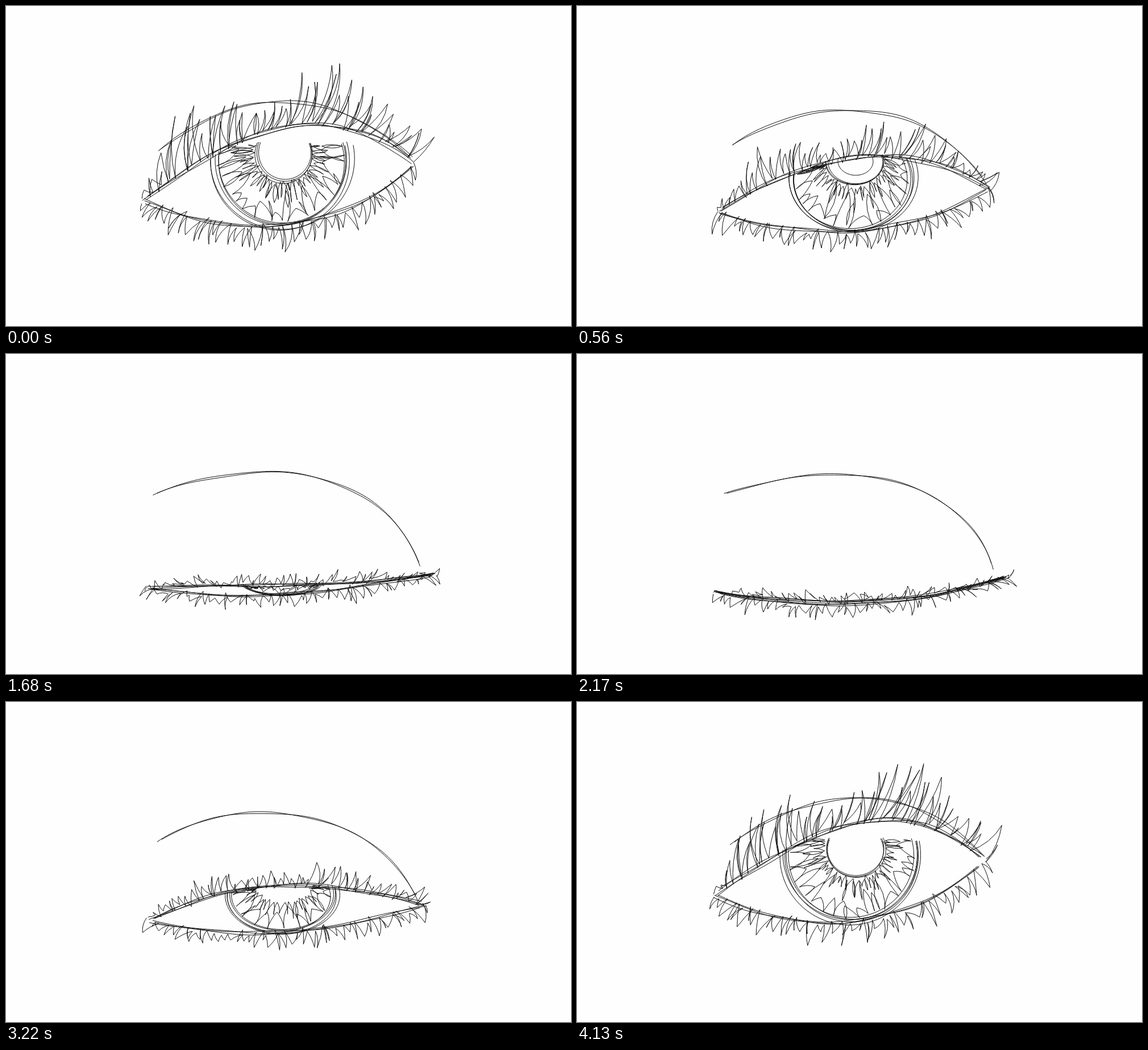
Recreate the animation shown at these times as an HTML page with a canvas. Size 994x563 px, loop 4200 ms.

```html
<!DOCTYPE html>
<html lang="en">
<head>
<meta charset="utf-8">
<title>Blinking eye</title>
<style>
  html, body { margin: 0; width: 100%; height: 100%; overflow: hidden; background: #fefefe; }
  canvas { display: block; }
</style>
</head>
<body>
<canvas id="stage" width="994" height="563"></canvas>
<script>
const ctx = document.getElementById('stage').getContext('2d');
const LOOP = 4200, STEP = 70;
const { sin, cos, min, max, round, PI } = Math;

// Time in ms and how far the eye is open
const blink = [
  [0, 1], [560, 0.78], [1120, 0.4], [1680, 0.16], [2100, 0],
  [2660, 0.3], [3220, 0.53], [4060, 1], [LOOP, 1]
];

const mix = (a, b, k) => a + (b - a) * k;
const between = (p, q, k) => [mix(p[0], q[0], k), mix(p[1], q[1], k)];
const unit = v => max(0, min(1, v));
const rad = d => d * PI / 180;
let rand;

function seeded(seed) {
  let s = seed * 7919 + 101;
  return () => {
    s = (s + 0x6D2B79F5) | 0;
    let v = Math.imul(s ^ (s >>> 15), 1 | s);
    v = (v + Math.imul(v ^ (v >>> 7), 61 | v)) ^ v;
    return ((v ^ (v >>> 14)) >>> 0) / 4294967296;
  };
}
const spread = r => (rand() * 2 - 1) * r;

function openness(t) {
  const i = blink.findIndex(key => key[0] > t);
  const [t0, a] = blink[i - 1], [t1, b] = blink[i];
  return mix(a, b, (t - t0) / (t1 - t0));
}

// A lid spans the corners and bulges by a on the left, b on the right
function lidCurve(left, right, a, b) {
  const height = u => mix(left[1], right[1], u) + 3 * u * (1 - u) * mix(a, b, u);
  return {
    at: u => [mix(left[0], right[0], u), height(u)],
    y: x => height(unit((x - left[0]) / (right[0] - left[0])))
  };
}

function bezier(p0, p1, p2, p3) {
  return {
    at: u => {
      const a = between(p0, p1, u), b = between(p1, p2, u), c = between(p2, p3, u);
      return between(between(a, b, u), between(b, c, u), u);
    }
  };
}

function line(points) {
  ctx.beginPath();
  points.forEach(p => ctx.lineTo(...p));
  ctx.stroke();
}

function sketch(curve, passes, wobble) {
  for (let n = 0; n < passes; n++) {
    const p = rand() * 7, q = rand() * 7, tilt = spread(wobble), from = rand() * 0.03, to = 1 - rand() * 0.03;
    const points = [];
    for (let i = 0; i <= 70; i++) {
      const k = i / 70, [x, y] = curve.at(mix(from, to, k));
      points.push([x, y + tilt * (k - 0.5) + wobble * (sin(k * 8 + p) * 0.7 + sin(k * 19 + q) * 0.3)]);
    }
    line(points);
  }
}

// One unbroken stroke, out to each tip and back
function zigzag(n, overlap, spike) {
  let here = spike(0).base;
  ctx.beginPath();
  ctx.moveTo(...here);
  for (let i = 0; i < n; i++) {
    const { tip, out, back } = spike((i + 0.5) / n);
    const next = spike((i + 1 + spread(overlap)) / n).base;
    const bow = (p, b) => [
      (p[0] + tip[0]) / 2 - (tip[1] - p[1]) * b,
      (p[1] + tip[1]) / 2 + (tip[0] - p[0]) * b
    ];
    ctx.quadraticCurveTo(...bow(here, out), ...tip);
    ctx.quadraticCurveTo(...bow(next, back), ...next);
    here = next;
  }
  ctx.stroke();
}

function lashes(curve, n, dir, length, left, right) {
  zigzag(n, 0.9, v => {
    const u = unit(v), [x, y] = curve.at(u);
    const base = [x + spread(3), y + spread(6)];
    const a = rad(mix(left, right, u) + spread(10));
    const len = length(u) * mix(0.4, 1, rand());
    const bend = (u < 0.4 ? 0.12 : -0.12) * dir;
    return {
      base,
      tip: [base[0] + sin(a) * len, base[1] + cos(a) * len * dir],
      out: bend + spread(0.08),
      back: bend + spread(0.1)
    };
  });
}

const ellipse = (cx, cy, rx, ry) => (a, s) => [cx + cos(a) * rx * s, cy + sin(a) * ry * s];

function ring(shape, scale, top, from, to, loose) {
  const dx = spread(loose), dy = spread(loose / 2), s = scale + spread(0.03), points = [];
  for (let d = from; d <= to; d += 4) {
    const [x, y] = shape(rad(d), s + 0.015 * sin(d / 40 + dx));
    if (y + dy >= top(x) - 3) points.push([x + dx, y + dy]);
  }
  line(points);
}

function drawIris(open, upper, lower) {
  const cx = 484, lidY = upper.y(cx), floor = lower.y(cx), gap = floor - lidY;
  if (gap < 9) return;

  const ry = 6 + 112 * open;
  const limit = max(lidY, 246);
  const top = x => max(upper.y(x), limit - 4);
  const outer = ellipse(cx, floor + 2 - ry, 50 + 70 * open ** 0.7, ry);
  const inner = ellipse(cx + 5, limit + 13 - 35 * (1 - open), 48 + spread(4), 8 + 39 * open);
  const keep = ([x, y]) => [x, min(lower.y(x) + 6, max(y, top(x) + rand() * 6))];

  for (let i = 0; i < 5; i++) ring(outer, 1.03 - i * 0.025, top, -60, 240, 5);
  if (gap > 95) {
    for (let i = 0; i < 3; i++) ring(inner, 1 + i * 0.03, top, -25, 205, 3);
    if (limit === lidY) ring(inner, 0.66, top, -70, 250, 2);
  }

  const petals = (n, inward, low, high) => zigzag(n, 0.6, u => {
    const a = rad(mix(-22, 202, u));
    const ends = [inner(a, 1.03), outer(a + spread(0.1), 0.95)];
    const [start, end] = inward ? ends.reverse() : ends;
    return {
      base: keep(between(start, end, rand() * 0.12)),
      tip: keep(between(start, end, mix(low, high, rand()))),
      out: 0.14 + spread(0.1),
      back: -0.14 + spread(0.1)
    };
  });
  const density = min(1, 0.3 + gap / 230);
  petals(round(40 * density), false, 0.2, 0.65);
  petals(round(24 * density), true, 0.25, 0.85);
}

function draw(step) {
  const open = openness(step * STEP), shut = 1 - open;
  rand = seeded(step + 1);
  ctx.fillStyle = '#fefefe';
  ctx.fillRect(0, 0, 994, 563);
  ctx.strokeStyle = '#111';
  ctx.lineWidth = 1;
  ctx.lineJoin = ctx.lineCap = 'round';

  const left = [240 + 10 * sin(PI * open), 418 - 76 * open ** 1.3];
  const right = [764 - 46 * open, 390 - 112 * open ** 2];
  const upper = lidCurve(left, right, 52 - 145 * (1 - shut ** 2.5), 52 - 210 * open);
  const lower = lidCurve(left, right, 15 + 65 * open + 45 * shut ** 8, 125 * open ** 2 + 60 * shut ** 6);
  const crease = bezier(
    [mix(255, 268, open), mix(245, 254, open)],
    [mix(390, 400, open), mix(195, 145, open)],
    [mix(690, 580, open), mix(185, 130, open)],
    [mix(734, 718, open), right[1] - 6]
  );

  sketch(crease, 2, 3.5);
  sketch(upper, 4, 2.5 + 3 * open);
  sketch(lower, 3, 2.5 + 2 * open);
  drawIris(open, upper, lower);

  // Upper lashes grow as the eye opens, in two tall clusters
  const tall = 20 + 68 * open ** 2.5;
  const cluster = u => min(1, 0.2 + u * 6) * (1 + 0.4 * open * cos((u - 0.66) * 13));
  lashes(upper, 52, -1, u => tall * cluster(u), -55 + 47 * open, 64 - 28 * open);
  lashes(lower, 44, 1, () => 26 + 18 * open ** 2, -38, 55 - 25 * open);
}

let shown = -1;
function tick() {
  const step = Math.floor(performance.now() % LOOP / STEP);
  if (step !== shown) draw(shown = step);
  requestAnimationFrame(tick);
}
tick();
</script>
</body>
</html>
```
